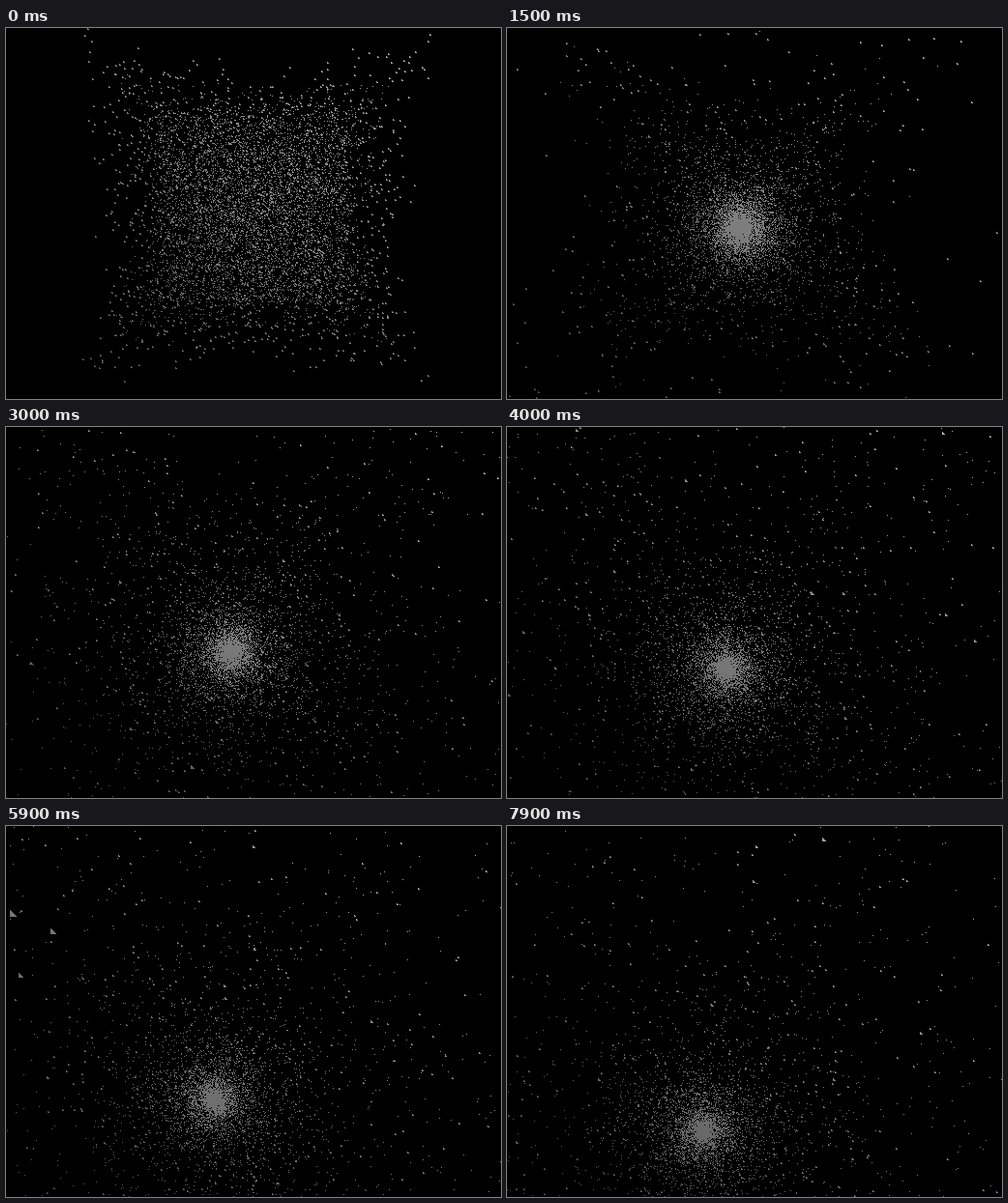
Write an HTML page with a canvas that moves like this. It is 512 px wide and 384 px high and loops after 8000 ms.

```html
<!DOCTYPE html>
<html>
<head>
<meta charset="utf-8">
<style>
html, body { margin: 0; width: 100%; height: 100%; overflow: hidden; background: #000; }
canvas { display: block; }
</style>
</head>
<body>
<canvas id="stage" width="512" height="384"></canvas>
<script>
const ctx = document.getElementById('stage').getContext('2d');
const COUNT = 7600, FOCAL = 412, DEPTH = 3.38, LOOP = 8000, STEP = 100;

let seed = 20177;
function rand() {
  seed = (seed + 0x6D2B79F5) | 0;
  let n = Math.imul(seed ^ (seed >>> 15), 1 | seed);
  n = (n + Math.imul(n ^ (n >>> 7), 61 | n)) ^ n;
  return ((n ^ (n >>> 14)) >>> 0) / 4294967296;
}
const spread = () => rand() * 2 - 1;

function direction() {
  const z = spread(), a = rand() * Math.PI * 2, r = Math.sqrt(1 - z * z);
  return [r * Math.cos(a), r * Math.sin(a), z];
}

// A cube of stars: the corners are flung out, the rest falls into a cluster.
function makeStar() {
  const cube = [spread(), spread(), spread()];
  const d2 = cube.reduce((sum, c) => sum + c * c, 0);
  const pinch = 1.1 * (1 - 0.34 * (1 - d2 / 3));
  const start = cube.map(c => c * pinch);
  const fall = 0.75 + 0.25 * rand();
  if (d2 + 0.6 * rand() > 1.82) {
    const speed = 0.15 + 3.3 * Math.pow(rand(), 1.15);
    const jitter = direction(), wobble = 0.12 + 0.15 / (speed + 0.3);
    const velocity = cube.map((c, i) => (jitter[i] * wobble - c / Math.sqrt(d2)) * speed);
    return { start, fall, velocity };
  }
  const mass = rand() * 0.92, q = Math.sqrt(mass);
  return {
    start, fall,
    compact: 0.18 / Math.sqrt(Math.pow(mass, -2 / 3) - 1),
    loose: q / (1 - q),
    u: direction(), v: direction(),
    phase: rand() * Math.PI * 2,
    rate: 1 / (q / (1 - q) * 0.15 + 0.15)
  };
}
const stars = Array.from({ length: COUNT }, makeStar);

function place(s, t) {
  const k = Math.min(1, t / s.fall) ** 2;
  if (s.velocity) {
    const after = Math.max(0, t - s.fall);
    return s.start.map((c, i) => c * (1 - k) + s.velocity[i] * after);
  }
  const relax = Math.min(1, Math.max(0, (t - 1) / 3));
  const loose = s.loose * (0.125 + 0.006 * t);
  const r = s.compact + (loose - s.compact) * relax, a = s.phase + s.rate * t;
  const cos = Math.cos(a) * r, sin = Math.sin(a) * r;
  return s.start.map((c, i) => c * (1 - k) + (s.u[i] * cos + s.v[i] * sin) * k);
}

function drawStar(s, t) {
  const [x, y, z] = place(s, t);
  const depth = DEPTH - z;
  if (depth < 0.4) return;
  const scale = FOCAL / depth, drift = s.velocity ? t / 2 : t;
  const px = Math.round(256 - 6 * drift + x * scale - Math.min(t, 1) * 6);
  const py = Math.round(188 + 17 * drift + y * scale - Math.min(t, 1) * 6);
  if (px < -8 || px > 512 || py < -8 || py > 384) return;
  const shade = Math.round(128 + (px - 256) * 0.1 - (py - 192) * 0.14);
  ctx.fillStyle = `rgb(${shade},${shade},${shade})`;
  const size = Math.max(1, Math.round(scale * 0.0102));
  for (let row = 0; row < size; row++) ctx.fillRect(px, py + row, row + 1, 1);
}

let shown = -1;
function frame(now) {
  const step = Math.floor((now % LOOP) / STEP);
  if (step !== shown) {
    shown = step;
    ctx.fillStyle = '#000';
    ctx.fillRect(0, 0, 512, 384);
    for (const s of stars) drawStar(s, step * STEP / 1000);
  }
  requestAnimationFrame(frame);
}
frame(0);
</script>
</body>
</html>
```
